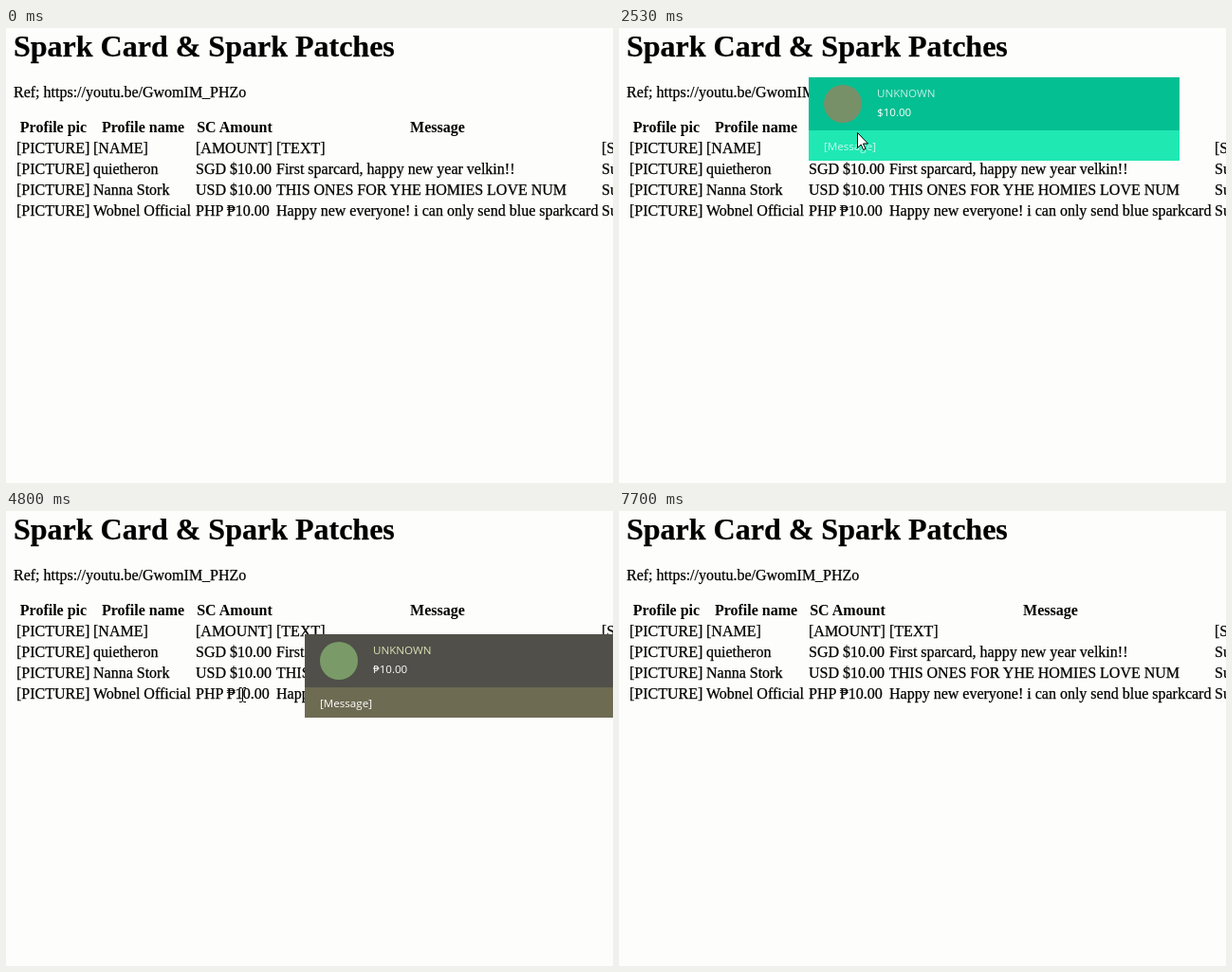
These frames come from a looping animation (640x480 px, 7.8 s). An HTML page:

```html
<!DOCTYPE html>
<html lang="en">
<head>
<meta charset="utf-8">
<title>Spark Card overlay</title>
<style>
  html, body { margin: 0; width: 100%; height: 100%; overflow: hidden; background: #fdfdfb; }
  svg { display: block; width: 640px; height: 480px; }
  .page { font: 16px "Liberation Serif", "Times New Roman", serif; stroke: #000; stroke-width: .25px; }
  .page .title { font-size: 32px; font-weight: bold; }
  .head { font-weight: bold; text-anchor: middle; stroke: none; }
  .card { font: 11.6px "Open Sans", "Noto Sans", sans-serif; fill: #fff; }

  .card, .cursor, .fade, .teal, .gray, .beam, .arrow {
    animation: 7.8s linear infinite;
  }
  .card { animation-name: drag; }
  .fade { animation-name: fade; }
  .cursor { animation-name: point; }
  .teal, .gray, .beam, .arrow { animation-timing-function: step-end; }
  .teal { animation-name: teal; }
  .gray { animation-name: gray; }
  .beam { animation-name: beam; }
  .arrow { animation-name: arrow; }

  @keyframes drag {
    0%, 32.82% { transform: translate(200px, 52px); }
    37.56%, 38.08% { transform: translate(318px, 86px); }
    41.03% { transform: translate(322px, 88px); }
    51.28% { transform: translate(317px, 118px); }
    53.85%, 100% { transform: translate(315px, 130px); }
  }
  @keyframes fade {
    0%, 22.05% { opacity: 0; }
    29.1%, 91.41% { opacity: 1; }
    98.6%, 100% { opacity: 0; }
  }
  /* While dragging, the pointer keeps an offset of 51, 58 from the card. */
  @keyframes point {
    0%, 20.9% { transform: translate(0, 170px); }
    23.08% { transform: translate(215px, 157px); }
    25.26%, 26.9% { transform: translate(228px, 155px); }
    30.77%, 32.82% { transform: translate(251px, 110px); }
    37.56%, 38.08% { transform: translate(369px, 144px); }
    41.03% { transform: translate(373px, 146px); }
    51.28% { transform: translate(368px, 176px); }
    53.85%, 55.13% { transform: translate(366px, 188px); }
    60.26%, 69.62% { transform: translate(249px, 194px); }
    74.36%, 76.92% { transform: translate(254px, 214px); }
    80.38%, 100% { transform: translate(4px, 365px); }
  }
  @keyframes teal { 0% { opacity: 1; } 58.33%, 100% { opacity: 0; } }
  @keyframes gray { 0% { opacity: 0; } 58.33%, 100% { opacity: 1; } }
  @keyframes beam {
    0% { opacity: 0; }
    20.9% { opacity: 1; }
    28.2% { opacity: 0; }
    57.4% { opacity: 1; }
    72.2%, 100% { opacity: 0; }
  }
  @keyframes arrow {
    0% { opacity: 0; }
    28.2% { opacity: 1; }
    57.4% { opacity: 0; }
    72.2% { opacity: 1; }
    80.5%, 100% { opacity: 0; }
  }
</style>
</head>
<body>
<svg viewBox="0 0 640 480">
  <g class="page">
    <text class="title" x="8" y="30">Spark Card &amp; Spark Patches</text>
    <text x="8" y="73">Ref; https://youtu.be/GwomIM_PHZo</text>
    <g class="head">
      <text x="50" y="110">Profile pic</text>
      <text x="144.5" y="110">Profile name</text>
      <text x="241" y="110">SC Amount</text>
      <text x="455" y="110">Message</text>
    </g>
    <g id="rows"></g>
  </g>

  <g class="card">
    <g class="fade">
      <g class="teal">
        <rect width="391" height="88" fill="#1fe8b3"/>
        <rect width="391" height="56" fill="#04bf92"/>
        <circle cx="36" cy="28" r="20" fill="#789068"/>
        <text x="72" y="21" fill-opacity=".75">UNKNOWN</text>
        <text x="72" y="41">$10.00</text>
        <text x="16" y="77" fill-opacity=".75">[Message]</text>
      </g>
      <g class="gray">
        <rect width="391" height="88" fill="#6e6b53"/>
        <rect width="391" height="56" fill="#504f49"/>
        <circle cx="36" cy="28" r="20" fill="#7a9b68"/>
        <text x="72" y="21" fill="#dedfb4">UNKNOWN</text>
        <text x="72" y="41">₱10.00</text>
        <text x="16" y="77">[Message]</text>
      </g>
    </g>
  </g>

  <g class="cursor">
    <path class="beam" d="M-3 -7.5H-1L.5 -6.5L2 -7.5H4M.5 -6.5V6.5M-3 7.5H-1L.5 6.5L2 7.5H4" fill="none" stroke="#000"/>
    <path class="arrow" d="M.5 .5V16.5L4.2 13L6.7 18.5L9 17.5L6.5 12H11.5Z" fill="#fff" stroke="#000"/>
  </g>
</svg>
<script>
  const columns = [11, 92, 200, 285, 628];
  const rows = [
    ["[PICTURE]", "[NAME]", "[AMOUNT]", "[TEXT]", "[S"],
    ["[PICTURE]", "quietheron", "SGD $10.00", "First sparcard, happy new year velkin!!", "Su"],
    ["[PICTURE]", "Nanna Stork", "USD $10.00", "THIS ONES FOR YHE HOMIES LOVE NUM", "Su"],
    ["[PICTURE]", "Wobnel Official", "PHP ₱10.00", "Happy new everyone! i can only send blue sparkcard", "Su"]
  ];
  document.getElementById("rows").innerHTML = rows.map((cells, r) =>
    cells.map((cell, c) => `<text x="${columns[c]}" y="${132 + 22 * r}">${cell}</text>`).join("")
  ).join("");
</script>
</body>
</html>
```
